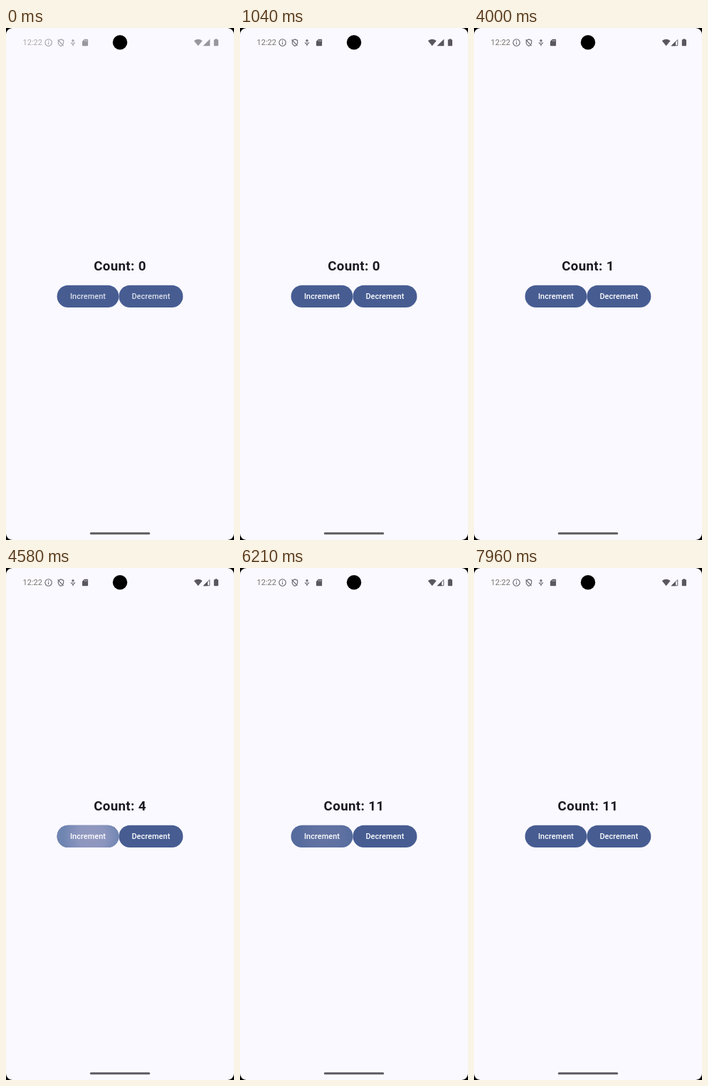
An HTML page that plays this animation: 320x720 px, repeating every 8000 ms.

```html
<!DOCTYPE html>
<html lang="en">
<head>
<meta charset="utf-8">
<title>Counter</title>
<style>
html, body { margin: 0; width: 100%; height: 100%; overflow: hidden; background: #000; }
svg { display: block; width: 320px; height: 720px; font-family: Roboto, sans-serif; }
.count { font-size: 18.67px; font-weight: 700; letter-spacing: .39px; fill: #1a1b20; }
.label { font-size: 10.9px; font-weight: 500; letter-spacing: .08px; fill: #fff; }
.clock { font-size: 11px; fill: #77736d; }
.line { fill: none; stroke: #66636a; stroke-width: 1.1; }
.solid { fill: #5a575e; }
</style>
</head>
<body>
<svg viewBox="0 0 320 720">
  <defs>
    <radialGradient id="glow" gradientUnits="userSpaceOnUse" cx="120" cy="377" r="40">
      <stop offset="0" stop-color="#969bc2"/>
      <stop offset=".5" stop-color="#8d97bf"/>
      <stop offset="1" stop-color="#7086b2"/>
    </radialGradient>
  </defs>
  <rect width="320" height="720" rx="9" fill="#faf9ff"/>

  <g id="status">
    <text class="clock" x="23.6" y="24.1">12:22</text>
    <g class="line">
      <circle cx="59.6" cy="20.5" r="4.7"/>
      <path d="M59.6 20v3M59.6 17.7v1.2"/>
      <path d="M74 17.2l3-1.3 3.7 1.5v3.2q0 3-3.7 4.9-3.7-1.9-3.7-4.9v-2M72.6 16.5l8 8.4"/>
      <path d="M94 16v5M91 20.3l3 3.2 3-3.2M92.3 18.3l1.7-1.8 1.7 1.8M94 23v2.3"/>
    </g>
    <path class="solid" d="M110 15.7h4.3q.8 0 .8.8v8q0 .8-.8.8h-6.5q-.8 0-.8-.8v-5.8z"/>
    <path d="M110.3 17v1.8M112 17v1.8M113.6 17v1.8" stroke="#dcdae2" stroke-width=".7"/>
    <path class="solid" d="M263.8 18q5.9-4.6 11.8 0l-5.9 7.3z"/>
    <path id="signalFull" class="solid" d="M276.5 25.2h9.8v-9.7z"/>
    <g id="signalWeak">
      <path d="M277.6 24.7h8.2v-8.1z" fill="none" stroke="#66636a"/>
      <path class="solid" d="M276.5 25.2h6.6v-6.5z"/>
    </g>
    <path class="solid" d="M293.6 15.3h2.6v1h1q.8 0 .8.8v7.4q0 .8-.8.8h-4.6q-.8 0-.8-.8v-7.4q0-.8.8-.8h1z"/>
  </g>
  <circle cx="160" cy="20.2" r="10.2"/>

  <text id="count" class="count" x="160" y="341.1" text-anchor="middle">Count: 0</text>
  <g fill="#475d92">
    <rect x="71.6" y="361.8" width="86.8" height="31.2" rx="15.6"/>
    <rect x="158.4" y="361.8" width="90" height="31.2" rx="15.6"/>
  </g>
  <rect id="ripple" x="71.6" y="361.8" width="86.8" height="31.2" rx="15.6" fill="url(#glow)"/>
  <g id="labels" class="label" text-anchor="middle">
    <text x="115" y="381.4">Increment</text>
    <text x="203.4" y="381.4">Decrement</text>
  </g>
  <rect x="117.8" y="709.2" width="84.4" height="3" rx="1.5" fill="#5e5b62"/>
</svg>
<script>
const LOOP = 8000;
const TAPS = 11, FIRST_TAP = 4000, TAP_GAP = 170;
const RISE = 100, HOLD = 450, FALL = 375;
const taps = Array.from({ length: TAPS }, (_, i) => FIRST_TAP + i * TAP_GAP);
const el = id => document.getElementById(id);
const clamp = v => Math.max(0, Math.min(1, v));
const fade = (id, value) => el(id).setAttribute('opacity', value);

// One tap's ripple: fade in, stay, fade out. Overlapping taps add up.
const ripple = age => clamp(age / RISE) * clamp(1 - (age - HOLD) / FALL);

function draw(t) {
  const intro = 1 - clamp((t - 290) / 500);
  const text = 'Count: ' + taps.filter(tap => tap <= t).length;
  const glow = taps.reduce((sum, tap) => sum + ripple(t - tap), 0);

  if (el('count').textContent !== text) el('count').textContent = text;
  fade('ripple', clamp(glow * .29));
  fade('status', 1 - .4 * intro);
  fade('labels', 1 - .2 * intro);
  fade('signalFull', t < 1960 ? 1 : 0);
  fade('signalWeak', t < 1960 ? 0 : 1);
}

const start = performance.now();
function tick() {
  draw((performance.now() - start) % LOOP);
  requestAnimationFrame(tick);
}
tick();
</script>
</body>
</html>
```
